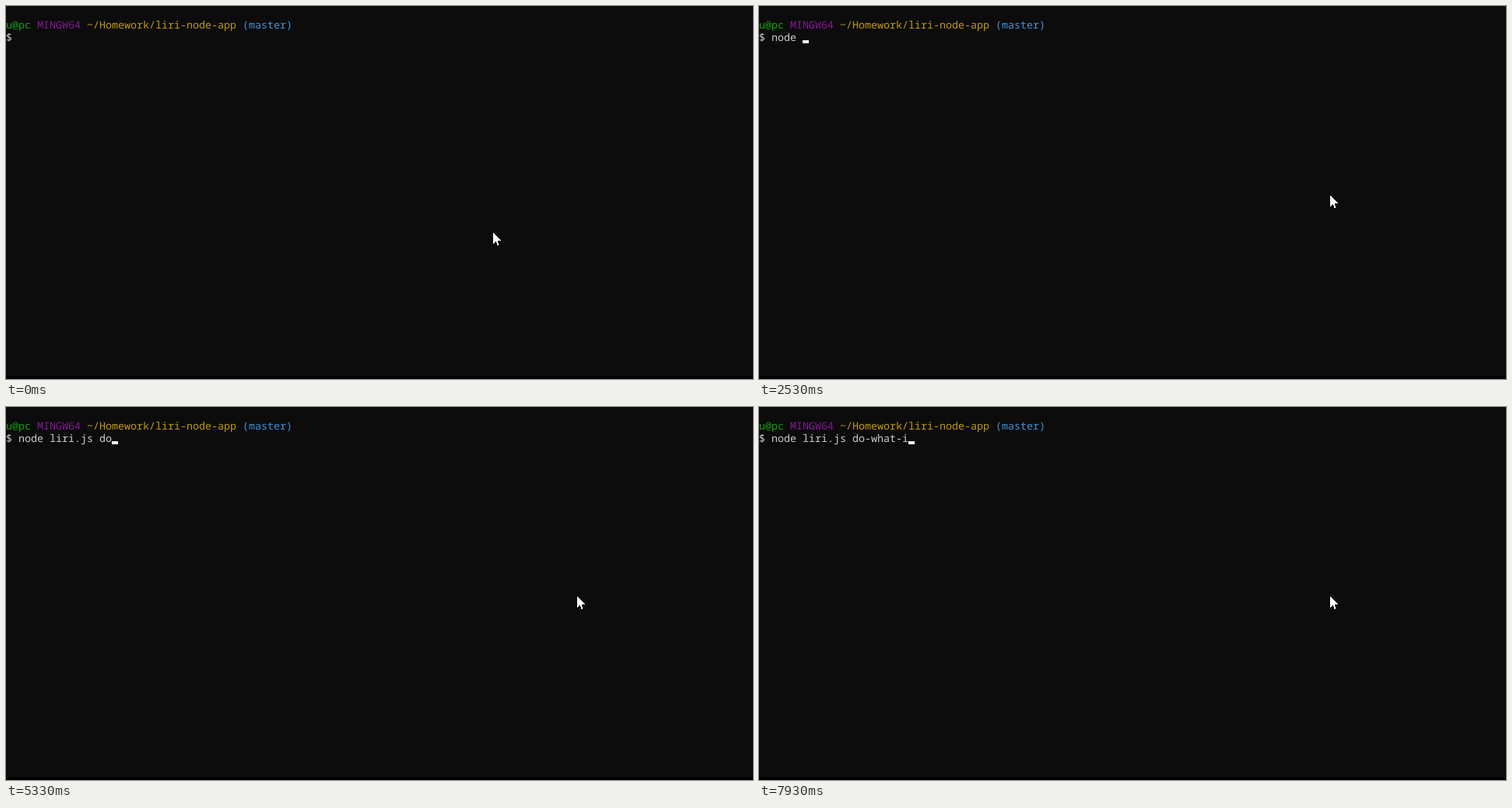
Write an HTML page that moves like this. It is 960 px wide and 480 px high and loops after 8000 ms.

```html
<!DOCTYPE html>
<html lang="en">
<head>
<meta charset="utf-8">
<title>Terminal</title>
<style>
  html, body { margin: 0; width: 960px; height: 480px; overflow: hidden; background: #0c0c0c; }
  svg { display: block; }
  text {
    font: 13.3333px "Noto Sans Mono", "DejaVu Sans Mono", monospace;
    text-rendering: geometricPrecision;
    white-space: pre;
    fill: #ccc;
  }
  #caret { fill: #fff; mix-blend-mode: difference; }
</style>
</head>
<body>
<svg width="960" height="480" viewBox="0 0 960 480">
  <rect width="960" height="480" fill="#0c0c0c"/>
  <rect y="476" width="960" height="4" fill="#040104"/>
  <g id="prompt"></g>
  <text x="0" y="45">$</text>
  <text id="typed" x="16" y="45"></text>
  <rect id="caret" y="44" width="8" height="4"/>
  <path id="mouse" fill="#fff" shape-rendering="crispEdges"/>
</svg>
<script>
const LOOP = 8000, CELL = 8;
const $ = id => document.getElementById(id);

// Prompt parts: column, colour, text
const parts = [
  [0, '#13a10e', 'u@pc'],
  [5, '#881798', 'MINGW64'],
  [13, '#c19c00', '~/Homework/liri-node-app'],
  [38, '#3a96dd', '(master)'],
];
for (const [col, color, str] of parts) {
  const el = document.createElementNS('http://www.w3.org/2000/svg', 'text');
  el.setAttribute('x', col * CELL);
  el.setAttribute('y', 29);
  el.style.fill = color;
  el.textContent = str;
  $('prompt').append(el);
}

// Arrow pointer as pixel runs: a growing triangle, then the notch and tail
const run = (x, y, w) => `M${x} ${y}h${w}v1h${-w}z`;
let arrow = '';
for (let y = 0; y < 10; y++) arrow += run(0, y, y + 1);
arrow += run(0, 10, 6);
for (let y = 11; y < 14; y++) arrow += run(0, y, 14 - y);
for (let y = 11; y < 16; y++) arrow += run(y < 13 ? 4 : 5, y, 2);
$('mouse').setAttribute('d', arrow);

// Time, keys pressed ('<' erases), caret: 1 on, 0 off, -1 on and one cell back
const keys = [
  [0, '', 0], [1600, '', 1],
  [2000, 'n', 1], [2070, 'o', 1], [2130, 'd', 1], [2330, 'e', 1], [2530, ' ', 1],
  [2670, 'l', 0], [2870, 'i', 1], [3200, '', 0], [3270, 'r', 1], [3330, 'i', 1],
  [3530, '.', 1], [3730, '', 0], [3870, 'j', 1], [4000, 's', 1],
  [4270, ' ', 0], [4670, 'd', 1], [4730, 'o', 1], [4800, '', 0], [5330, '', 1],
  [5800, '-', 1], [5870, '', 0], [6000, 'w', 1], [6200, 'g', 1], [6400, '', 0],
  [6930, '', -1], [7000, '<', 1],
  [7270, 'h', 1], [7330, 'a', 1], [7470, 't', 1], [7730, '-', 1], [7930, 'i', 1],
];
let line = '';
const typing = keys.map(([ms, key, caret]) => {
  line = key === '<' ? line.slice(0, -1) : line + key;
  return [ms, line, caret];
});

// Time and share of the pointer's way
const moves = [[0, 0], [400, 0.22], [470, 0.57], [530, 0.86], [600, 1]];

const at = (steps, t) => steps.findLast(step => step[0] <= t);

function draw(t) {
  const [, str, caret] = at(typing, t);
  $('typed').textContent = str;
  $('caret').setAttribute('x', 16 + CELL * (str.length - (caret < 0)));
  $('caret').setAttribute('visibility', caret ? 'visible' : 'hidden');
  const way = at(moves, t)[1];
  const x = Math.round(626 + 108 * way), y = Math.round(292 - 48 * way);
  $('mouse').setAttribute('transform', `translate(${x} ${y})`);
}

const start = performance.now();
function tick() {
  draw((performance.now() - start) % LOOP);
  requestAnimationFrame(tick);
}
tick();
</script>
</body>
</html>
```
